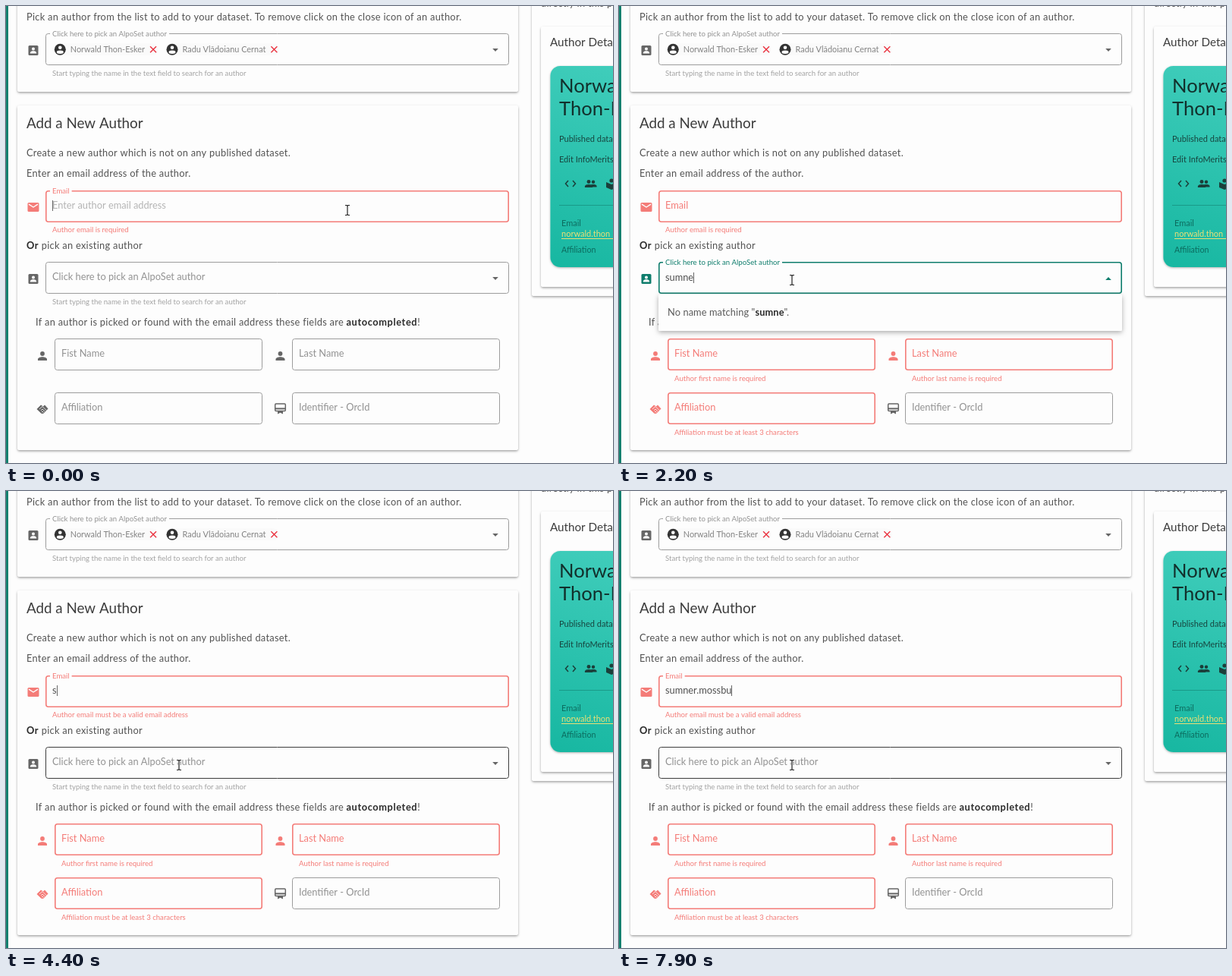
Animation, 800 px wide and 602 px high, one loop 8 s. Source, as an HTML page with a canvas:

```html
<!DOCTYPE html>
<html lang="en">
<head>
<meta charset="utf-8">
<title>Add a New Author</title>
<style>
html, body { margin: 0; width: 100%; height: 100%; overflow: hidden; background: #fdfdfd; }
canvas { display: block; }
</style>
</head>
<body>
<canvas id="stage" width="800" height="602"></canvas>
<script>
const ctx = document.getElementById('stage').getContext('2d');
const LOOP = 8000, STEP = 100;
const PAGE = '#fdfdfd', TEAL = '#0e7d6c', RED = '#f47c78', GREY = '#9c9c9c', ICON = '#666', INK = '#525252';
const THICK = 1.6, SPACING = 0.29;
const FACE = 'Lato, "Open Sans", sans-serif';
const PICK = 'Click here to pick an AlpoSet author';
const HINT = 'Start typing the name in the text field to search for an author';
const PEOPLE = ['Henrietta Quellmorner', 'Noemí Tarvado', 'Joachim Weldorn',
  'Marcela Truxo', 'Dorothea Ollweit', 'Brent K. Orley'];

// Typing: [time, number of letters of WORD]
const WORD = 'sumner.mossbu';
const SEARCH = [[0, 0], [1000, 1], [1200, 2], [1400, 3], [1600, 4], [1800, 5],
  [2400, 4], [2500, 3], [2600, 2], [2800, 1], [3400, 0]];
const MAIL = [[0, 0], [4300, 1], [4700, 2], [4900, 3], [5100, 4], [5300, 5], [5500, 6],
  [5700, 7], [5900, 8], [6100, 9], [6300, 10], [6900, 11], [7300, 12], [7700, 13]];
const FOCUS_PICK = 700, ERRORS = 800, OPEN = 900, CLOSE = 3700, FOCUS_MAIL = 4000;

const clamp = v => Math.max(0, Math.min(1, v));
const ease = v => 1 - (1 - clamp(v)) ** 2;
const lerp = (a, b, k) => a + (b - a) * k;

function typed(log, t) {
  const [since, count] = log.filter(s => s[0] <= t).pop();
  return { text: WORD.slice(0, count), since };
}

function text(str, x, y, size, color, gap = 0, weight = 400) {
  ctx.font = `${weight} ${size}px ${FACE}`;
  ctx.letterSpacing = gap + 'px';
  ctx.fillStyle = color;
  ctx.fillText(str, x, y);
  return x + ctx.measureText(str).width;
}
const body = (str, x, y) => text(str, x, y, 12.8, INK, SPACING);
const strong = (str, x, y) => text(str, x, y, 12.8, '#2a2a2a', 0.6, 700);

function box(x, y, w, h, r, fill, stroke, width = 1) {
  ctx.beginPath();
  ctx.roundRect(x, y, w, h, r);
  if (fill) { ctx.fillStyle = fill; ctx.fill(); }
  if (stroke) { ctx.strokeStyle = stroke; ctx.lineWidth = width; ctx.stroke(); }
}

function shape(points, fill) {
  ctx.beginPath();
  points.forEach(p => ctx.lineTo(p[0], p[1]));
  ctx.fillStyle = fill;
  ctx.fill();
}

function lines(paths, color, width) {
  ctx.beginPath();
  for (const path of paths) path.forEach((p, i) => i ? ctx.lineTo(p[0], p[1]) : ctx.moveTo(p[0], p[1]));
  ctx.strokeStyle = color;
  ctx.lineWidth = width;
  ctx.stroke();
}

function at(x, y, draw, scale = 1, angle = 0) {
  ctx.save();
  ctx.translate(x, y);
  ctx.rotate(angle);
  ctx.scale(scale, scale);
  draw();
  ctx.restore();
}

function dot(x, y, r, color) {
  ctx.beginPath();
  ctx.arc(x, y, r, 0, 7);
  ctx.fillStyle = color;
  ctx.fill();
}

// The shadow is clipped to the outside so that a translucent panel stays clean
function panel(x, y, w, h, r, fill, blur, drop, shade) {
  ctx.save();
  ctx.beginPath();
  ctx.rect(0, 0, 800, 602);
  ctx.roundRect(x, y, w, h, r);
  ctx.clip('evenodd');
  ctx.shadowColor = `rgba(0,0,0,${shade})`;
  ctx.shadowBlur = blur;
  ctx.shadowOffsetY = drop;
  box(x, y, w, h, r, fill);
  ctx.restore();
  box(x, y, w, h, r, fill);
}
const card = (x, y, w, h) => panel(x, y, w, h, 3, PAGE, 3, 1.5, 0.36);

function person(x, y, color, scale = 1) {
  at(x, y, () => {
    dot(0, -3, 2.9, color);
    ctx.beginPath();
    ctx.moveTo(-6, 6);
    ctx.lineTo(-6, 4.4);
    ctx.bezierCurveTo(-6, 2, -2.5, 1.2, 0, 1.2);
    ctx.bezierCurveTo(2.5, 1.2, 6, 2, 6, 4.4);
    ctx.lineTo(6, 6);
    ctx.fill();
  }, scale);
}

function accountBox(x, y, color) {
  box(x - 6.5, y - 6.5, 13, 13, 1.5, color);
  person(x, y, PAGE, 0.68);
}

function accountCircle(x, y) {
  dot(x, y, 7.5, '#333');
  dot(x, y - 2.5, 2.3, '#fff');
  ctx.beginPath();
  ctx.ellipse(x, y + 3.4, 4.5, 2.2, 0, 0, 7);
  ctx.fill();
}

function envelope(x, y, color) {
  box(x - 7.5, y - 6, 15, 12, 1.5, color);
  lines([[[x - 6, y - 3.8], [x, y], [x + 6, y - 3.8]]], PAGE, 1.4);
}

function hands(x, y, color) {
  at(x, y, () => {
    shape([[-7.5, 0], [-2, -5.5], [1, -3.5], [3, -5.5], [7.5, -0.5], [1, 6], [-1.5, 5.8]], color);
    lines([[[-4, 0], [0, -3.5], [5, 1.5]], [[-2, 2], [0, 0], [3, 3]], [[-1, 4], [0, 3], [1.5, 4.5]]], PAGE, 0.8);
  });
}

function badge(x, y) {
  box(x - 6.8, y - 6, 13.6, 9.5, 1.2, null, ICON, 1.5);
  lines([[[x - 7, y + 0.4], [x + 7, y + 0.4]]], ICON, 2);
  shape([[x - 3.5, y + 3], [x + 3.5, y + 3], [x + 3.5, y + 7.5], [x, y + 5.8], [x - 3.5, y + 7.5]], ICON);
}

function arrow(x, y, color, turn = 0) {
  at(x, y, () => shape([[-3.8, -1.9], [3.8, -1.9], [0, 1.9]], color), 1, -turn * Math.PI);
}

// Outlined input; k is how far the label has floated into the border
function field(x, y, w, label, k, line, width, tint) {
  const inset = width / 2;
  box(x + inset, y + inset, w - width, 42 - width, 3, PAGE, line, width);
  const size = lerp(12.8, 9.6, k);
  if (k > 0) {
    ctx.font = `400 9.6px ${FACE}`;
    ctx.letterSpacing = '0px';
    const gap = (ctx.measureText(label).width + 6) * k;
    ctx.fillStyle = PAGE;
    ctx.fillRect(x + 6, y - 1, gap, 3);
  }
  text(label, x + 9, y + lerp(24, 3.5, k), size, tint);
}

function chip(name, x, y, closable) {
  ctx.font = `400 10.9px ${FACE}`;
  ctx.letterSpacing = '0px';
  const w = ctx.measureText(name).width;
  box(x - 8, y - 8, w + (closable ? 39 : 30), 16, 8, '#fafafa');
  accountCircle(x, y);
  const end = text(name, x + 13.5, y + 4, 10.9, '#828282');
  if (!closable) return;
  const cx = end + 11;
  lines([[[cx - 4, y - 4], [cx + 4, y + 4]], [[cx + 4, y - 4], [cx - 4, y + 4]]], '#ea3340', 1.4);
}

function caret(x, y, age) {
  if (age % 1000 < 500) { ctx.fillStyle = '#666'; ctx.fillRect(Math.round(x), y - 11, 1, 14); }
}

function sidebar() {
  card(693, -20, 140, 402);
  body('directly in this panel', 705, 1);
  card(705, 27, 130, 343);
  text('Author Details', 717, 53, 15.2, '#3c3c3c');
  const g = ctx.createLinearGradient(800, 79, 717, 344);
  g.addColorStop(0, '#40cdbb');
  g.addColorStop(1, '#17b7a1');
  panel(717.5, 79, 140, 265, 13, g, 3, 1, 0.3);
  text('Norwald', 729, 114, 25.6, '#12302c');
  text('Thon-Esker', 729, 144, 25.6, '#12302c');
  text('Published datasets', 729, 179, 11, '#17453f');
  text('Edit InfoMerits', 729, 206, 11, '#17453f');
  lines([[[741, 230], [737.5, 234], [741, 238]], [[747, 230], [750.5, 234], [747, 238]]], '#1b3f3a', 1.5);
  person(774, 234, '#1b3f3a', 0.75);
  person(768, 234, '#1b3f3a', 0.85);
  shape([[791, 232], [798, 235], [805, 232], [805, 239], [798, 242], [791, 239]], '#1b3f3a');
  dot(798, 230, 2.6, '#1b3f3a');
  lines([[[729, 262.5], [800, 262.5]]], 'rgba(0,70,60,.3)', 1);
  const dim = 'rgba(0,60,52,.62)';
  text('Email', 732, 290, 11, dim);
  text('norwald.thon', 732, 304, 11, '#ecdf75');
  lines([[[732, 306.5], [800, 306.5]]], '#ecdf75', 1);
  text('Affiliation', 732, 325, 10.7, dim);
}

function topCard() {
  card(15, -20, 660, 133);
  body('Pick an author from the list to add to your dataset. To remove click on the close icon of an author.', 27, 19);
  accountBox(36, 58.5, ICON);
  field(52, 36, 611, PICK, 1, GREY, 1, '#929292');
  chip('Norwald Thon-Esker', 71.3, 57.3, true);
  chip('Radu Vlădoianu Cernat', 219, 57.3, true);
  arrow(645, 58, ICON);
  text(HINT, 61, 92, 9.6, '#a2a2a2');
}

function details(bad) {
  const tone = bad ? RED : GREY, label = bad ? RED : '#929292', icon = bad ? RED : ICON, wide = bad ? THICK : 1;
  const end = body('If an author is picked or found with the email address these fields are ', 39, 420.5);
  body('!', strong('autocompleted', end, 420.5), 420.5);
  person(48, 461, icon);
  person(361.5, 461, icon);
  hands(48, 531, icon);
  badge(361.5, 530);
  field(64, 438, 274, 'Fist Name', 0, tone, wide, label);
  field(377, 438, 274, 'Last Name', 0, tone, wide, label);
  field(64, 509, 274, 'Affiliation', 0, tone, wide, label);
  field(377, 509, 274, 'Identifier - OrcId', 0, GREY, 1, '#929292');
  if (!bad) return;
  text('Author first name is required', 73, 494, 9.6, RED);
  text('Author last name is required', 386, 494, 9.6, RED);
  text('Affiliation must be at least 3 characters', 73, 564.5, 9.6, RED);
}

function menu(query, alpha) {
  if (alpha <= 0) return;
  const full = query.length < 2;
  ctx.save();
  ctx.globalAlpha = alpha;
  panel(52, 380, 611, full ? 240 : 48, 2, PAGE, 6, 2, 0.32);
  if (full) {
    PEOPLE.forEach((name, i) => chip(name, 74.5, 403.5 + 36.1 * i));
    ctx.fillStyle = '#f3f3f3';
    ctx.fillRect(651, 381, 12, 221);
    ctx.fillStyle = '#c1c1c1';
    ctx.fillRect(652, 392, 10, 63);
    shape([[654.5, 388], [659.5, 388], [657, 385]], '#999');
    shape([[654, 599.5], [660, 599.5], [657, 602.5]], '#444');
  } else {
    const x = text('No name matching "', 64, 407.5, 12.8, '#5a5a5a', 0.1);
    const end = text(query, x, 407.5, 12.8, '#2a2a2a', 0.1, 700);
    text('".', end, 407.5, 12.8, '#5a5a5a', 0.1);
  }
  ctx.restore();
}

function pointer(x, y) {
  at(x, y, () => {
    const beam = [[[-3, -6.5], [-1, -6.5], [0, -5.5], [1, -6.5], [3, -6.5]],
      [[0, -5.5], [0, 5.5]], [[-3, 6.5], [-1, 6.5], [0, 5.5], [1, 6.5], [3, 6.5]]];
    lines(beam, '#fff', 2.6);
    lines(beam, '#222', 1.2);
  });
}

function draw(t) {
  const picking = t >= FOCUS_PICK && t < FOCUS_MAIL;
  const search = typed(SEARCH, t), mail = typed(MAIL, t);
  const glide = clamp((t - 200) / 400), move = glide * glide * (3 - 2 * glide);
  const mx = lerp(450, 228, move), my = lerp(269, 361, move);
  const picked = ease((t - FOCUS_PICK) / 250) * (1 - ease((t - FOCUS_MAIL) / 250));
  const mailed = 1 - ease((t - FOCUS_PICK) / 250) + ease((t - FOCUS_MAIL) / 250);
  const opened = ease((t - OPEN) / 200) * (1 - ease((t - CLOSE) / 200));

  ctx.fillStyle = PAGE;
  ctx.fillRect(0, 0, 800, 602);
  ctx.fillStyle = '#14806f';
  ctx.fillRect(0, 0, 3, 602);
  sidebar();
  topCard();

  card(15, 131, 660, 454);
  text('Add a New Author', 27, 161, 18.8, '#3c3c3c');
  body('Create a new author which is not on any published dataset.', 27, 198);
  body('Enter an email address of the author.', 27, 225);

  envelope(36, 265, RED);
  field(52, 243, 611, 'Email', mailed, RED, THICK, RED);
  if (!picking) {
    const end = text(mail.text, 61, 267, 12.8, '#505050');
    if (!mail.text) text('Enter author email address', 61, 267, 12.8, `rgba(180,180,180,${mailed})`);
    caret(end, 267, t - Math.max(mail.since, t < FOCUS_MAIL ? 0 : FOCUS_MAIL));
  }
  text(mail.text ? 'Author email must be a valid email address' : 'Author email is required', 61, 298, 9.6, RED);

  const end = strong('Or', 27, 320);
  body(' pick an existing author', end, 320);
  accountBox(36, 359.5, picking ? TEAL : ICON);
  const line = picking ? TEAL : my > 338 ? '#3c3c3c' : GREY;
  field(52, 337, 611, PICK, picked, line, picking ? THICK : 1, picking ? TEAL : '#929292');
  arrow(645, 359, picking ? TEAL : ICON, opened);
  text(HINT, 61, 393, 9.6, '#a2a2a2');
  if (picking) {
    const edge = text(search.text, 61, 362, 12.8, '#505050');
    caret(edge, 362, t - Math.max(search.since, FOCUS_PICK));
  }
  details(t >= ERRORS);
  menu(search.text, opened);
  pointer(mx, my);
}

function frame(now) {
  draw(Math.floor(now % LOOP / STEP) * STEP);
  requestAnimationFrame(frame);
}
requestAnimationFrame(frame);
</script>
</body>
</html>
```
